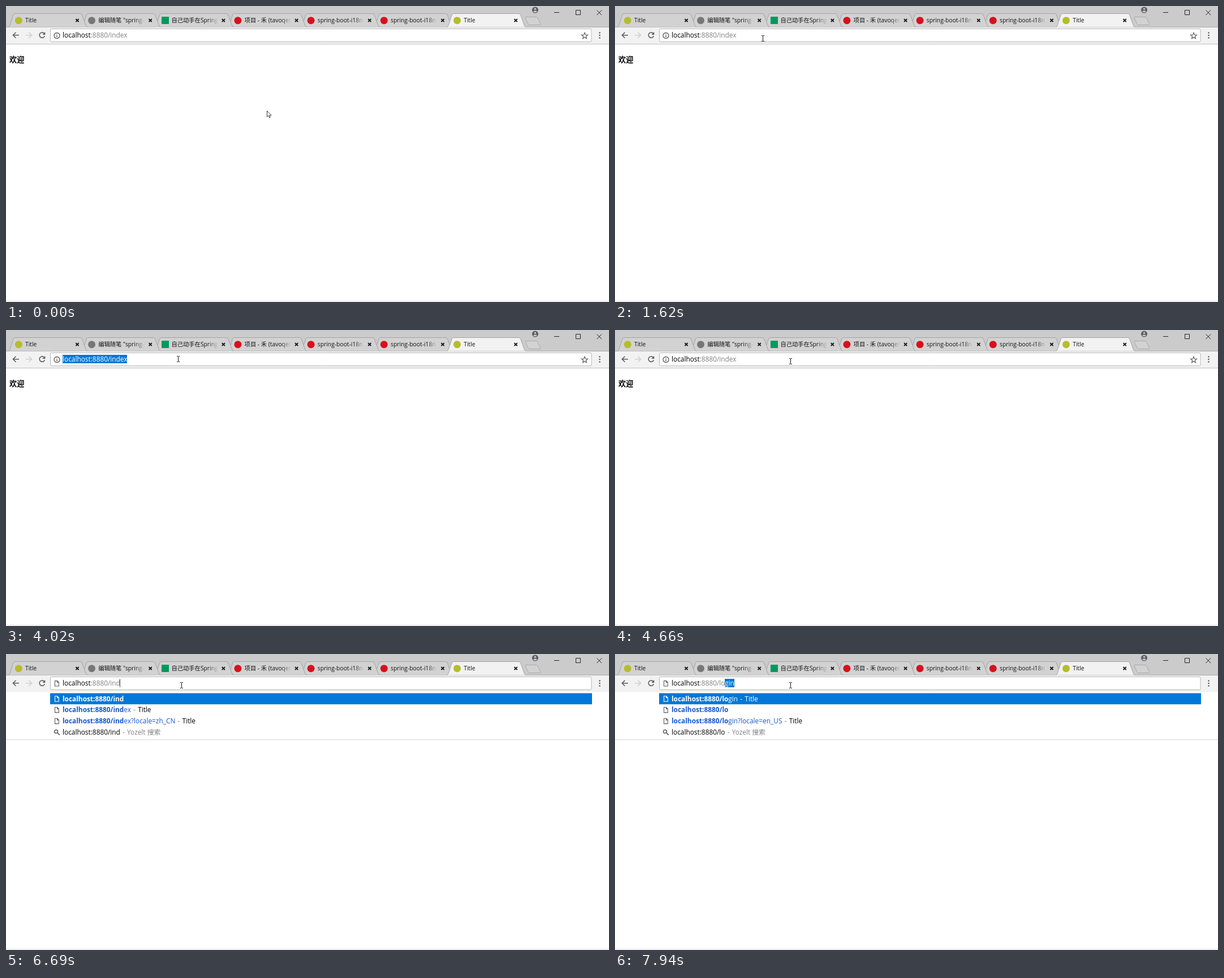
Animation, 1066 px wide and 525 px high, one loop 8 s. Source, as an HTML page with a canvas:

```html
<!DOCTYPE html>
<html lang="zh-CN">
<head>
<meta charset="utf-8">
<title>Browser address bar</title>
<style>
html, body { margin: 0; width: 100%; height: 100%; overflow: hidden; background: #fff; }
canvas { display: block; }
</style>
</head>
<body>
<canvas id="stage" width="1066" height="525"></canvas>
<script>
const ctx = document.getElementById("stage").getContext("2d");
const LOOP = 8000;
const FAMILY = '"Open Sans", "Noto Sans CJK SC", "Noto Sans CJK", sans-serif';
const BLUE = "#0078d7", LINK = "#1558cc", GREY = "#808080", ICON = "#5a5a5a";
const HOST = "localhost", BASE = "localhost:8880/";
const TEXT_X = 100, URL_SIZE = 11.86, ROW_HEIGHT = 19.7;
const TAB_PITCH = 129.2;
const TABS = [
  ["Title", "#b5bd2b"],
  ['编辑随笔 "spring-boot', "#777"],
  ["自己动手在Spring Boot", "#009a61", true],
  ["项目 - 禾 (tavoqen)", "#d8101c"],
  ["spring-boot-i18n", "#d8101c"],
  ["spring-boot-i18n", "#d8101c"],
  ["Title", "#b5bd2b"],
];

// Time, x, y of the pointer; each position holds until the next.
const POINTER = [
  [0, 461.5, 186], [70, 452, 178], [147, 415, 150], [223, 355, 108],
  [300, 305, 72], [377, 277, 50], [453, 265.5, 44.5], [530, 262.5, 50.5],
  [607, 261.5, 57.5], [2930, 264.5, 57.5], [3100, 272.5, 62.5], [3160, 291, 74],
  [3330, 299.5, 62.5], [3410, 303.5, 60.5], [3710, 303.5, 56.5], [3940, 310.5, 55.5],
  [4020, 304.5, 51.5], [4100, 296.5, 46.5], [4250, 310.5, 55.5],
];

// Time, path in the address bar, and what is shown with it.
const ADDRESS = [
  [0, "index", {}],
  [760, "index", { selectFrom: 0 }],
  [1620, "index", {}],
  [3410, "index", { caret: true }],
  [3710, "index", { selectFrom: 0 }],
  [4100, "index", { caret: true }],
  [4580, "index", {}],
  [5120, "index", { caret: true }],
  [5670, "index", {}],
  [6200, "index", { caret: true }],
  [6520, "inde", { caret: true, list: true }],
  [6690, "ind", { caret: true, list: true }],
  [6860, "in", { caret: true, list: true }],
  [7080, "i", { caret: true, list: true }],
  [7230, "", { caret: true, list: true }],
  [7630, "l", { completion: "ogin", list: true }],
  [7940, "lo", { completion: "gin", list: true }],
];

const at = (steps, time) => steps.filter(step => step[0] <= time).pop();

function rect(x, y, w, h, color) {
  ctx.fillStyle = color;
  ctx.fillRect(x, y, w, h);
}

function shape(path, { fill, stroke, width = 1, x = 0, y = 0 }) {
  const outline = new Path2D(path);
  ctx.save();
  ctx.translate(x, y);
  if (fill) { ctx.fillStyle = fill; ctx.fill(outline); }
  if (stroke) { ctx.strokeStyle = stroke; ctx.lineWidth = width; ctx.stroke(outline); }
  ctx.restore();
}

function circle(x, y, r, fill) {
  ctx.beginPath();
  ctx.arc(x, y, r, 0, Math.PI * 2);
  ctx.fillStyle = fill;
  ctx.fill();
}

// Draws text and returns the x where it ends.
function text(string, x, y, color, size = URL_SIZE, weight = 400) {
  ctx.font = `${weight} ${size}px ${FAMILY}`;
  ctx.fillStyle = color;
  ctx.fillText(string, x, y);
  return x + ctx.measureText(string).width;
}

function widthOf(string) {
  ctx.font = `400 ${URL_SIZE}px ${FAMILY}`;
  return ctx.measureText(string).width;
}

function drawTab([title, color, square], index) {
  const x = index * TAB_PITCH;
  const active = index === TABS.length - 1;
  shape("M4 37.5 Q6 37 7 34 L13 16 Q14 13.5 16 13.5 H131 Q133.5 13.5 134.5 16 L141 34 Q142 37 144 37.5",
    { x, fill: active ? "#f2f2f2" : "#d2d2d2", stroke: "#a3a3a3" });
  if (square) rect(x + 16.6, 19, 13, 13, color);
  else circle(x + 22.3, 25.7, 6.5, color);
  const fade = ctx.createLinearGradient(x + 98, 0, x + 117, 0);
  fade.addColorStop(0, "#111");
  fade.addColorStop(1, "rgba(17,17,17,0)");
  text(title, x + 34, 29.2, fade, 10.3);
  shape("M-2.6 -2.6 L2.6 2.6 M2.6 -2.6 L-2.6 2.6",
    { x: x + 126, y: 25.6, stroke: "#111", width: 1.8 });
}

function drawWindow() {
  rect(0, 0, 1066, 525, "#fff");
  rect(0, 0, 1066, 38, "#cbcbcb");
  rect(0, 37, 1066, 1, "#ababab");
  rect(0, 38, 1066, 29, "#f2f2f2");
  rect(0, 67, 1066, 1, "#c0c0c0");
  rect(0, 523, 1066, 1, "#d9d9d9");
  // Left tabs overlap right ones; the active last tab covers all.
  const last = TABS.length - 1;
  for (let i = last - 1; i >= 0; i--) drawTab(TABS[i], i);
  drawTab(TABS[last], last);

  shape("M919 19.5 H937 Q939 19.5 940 21.5 L945 32 Q945 33.5 943 33.5 H926 Q924 33.5 923 31.5 L918 21 Q918 19.5 919 19.5Z",
    { fill: "#d2d2d2", stroke: "#aaa" });
  circle(935.5, 7, 5.5, "#5c5c64");
  circle(935.5, 5.2, 1.7, "#cbcbcb");
  shape("M932 9.7 Q935.5 6.8 939 9.7 Q935.5 12.8 932 9.7Z", { fill: "#cbcbcb" });
  shape("M969 11.5 H978 M1007.5 7.5 H1015.5 V15.5 H1007.5Z M1044.5 7.5 L1053 16 M1053 7.5 L1044.5 16",
    { stroke: "#222" });

  const arrow = "M5.5 0 H-4.5 M0 -5 L-5 0 L0 5";
  shape(arrow, { x: 17.5, y: 51.7, stroke: ICON, width: 1.6 });
  ctx.save();
  ctx.translate(40.5, 51.7);
  ctx.scale(-1, 1);
  shape(arrow, { stroke: "#d0d0d0", width: 1.6 });
  ctx.restore();
  shape("M67.2 48.3 A4.7 4.7 0 1 0 68.3 53.2", { stroke: ICON, width: 1.6 });
  shape("M69.3 46 V51 H64.3Z", { fill: ICON });

  shape("M80.5 40.5 H1033 Q1035 40.5 1035 42.5 V61.5 Q1035 63.5 1033 63.5 H80.5 Q78.5 63.5 78.5 61.5 V42.5 Q78.5 40.5 80.5 40.5Z",
    { fill: "#fff", stroke: "#b5b5b5" });
  for (const y of [47.5, 52, 56.5]) circle(1049.5, y, 1.3, ICON);
}

function drawPageIcon(y, color) {
  shape("M-3.2 -4.7 H1 L3.6 -2 V4.7 H-3.2Z M0.8 -4.7 V-1.8 H3.6",
    { x: 89.7, y, stroke: color, width: 1.1 });
}

function drawInfoAndStar() {
  shape("M95 52.5 A5 5 0 1 1 85 52.5 A5 5 0 1 1 95 52.5", { stroke: ICON, width: 1.3 });
  rect(89.3, 52, 1.4, 3.3, ICON);
  rect(89.3, 49.6, 1.4, 1.4, ICON);
  let star = "";
  for (let i = 0; i < 10; i++) {
    const angle = i * Math.PI / 5, r = i % 2 ? 2.5 : 5.7;
    star += `${i ? "L" : "M"}${r * Math.sin(angle)} ${-r * Math.cos(angle)}`;
  }
  shape(star + "Z", { x: 1023, y: 53, stroke: ICON, width: 1.2 });
}

function drawAddress(path, { selectFrom, caret, completion = "" }) {
  const url = BASE + path + completion;
  const start = completion ? (BASE + path).length : selectFrom ?? url.length;
  const hostEnd = text(HOST, TEXT_X, 56.4, "#000");
  text(url.slice(HOST.length), hostEnd, 56.4, GREY);
  if (start < url.length) {
    const x = Math.round(TEXT_X + widthOf(url.slice(0, start)));
    const end = Math.round(TEXT_X + widthOf(url));
    rect(x, 44, end - x, 15, BLUE);
    text(url.slice(start), x, 56.4, "#fff");
  }
  if (caret) rect(Math.floor(TEXT_X + widthOf(url)), 44, 1, 15, "#555");
}

// Suggestions as bold part, plain part and page title.
function suggestions(path) {
  const typed = BASE + path;
  const match = (page, title = "Title") => [typed, page.slice(path.length), title];
  if (!path) return [
    ["localhost:8880", "", "Title"], match("index"), match("index?locale=zh_CN"),
    match("login?locale=en_US"), match("login"),
  ];
  if (path[0] === "i") return [[typed, ""], match("index"), match("index?locale=zh_CN")];
  return [match("login"), [typed, ""], match("login?locale=en_US")];
}

function drawTail(title, x, y, dashColor, color) {
  text("-", x + 4.2, y, dashColor);
  text(title, x + 12.2, y, color);
}

function drawList(path) {
  const rows = suggestions(path);
  const bottom = Math.floor(73 + ROW_HEIGHT * (rows.length + 1));
  rect(0, 66, 1066, bottom - 66, "#fff");
  rect(0, 66, 1066, 1, "#ededed");
  rect(0, bottom, 1066, 1, "#dedede");
  rect(0, bottom + 1, 1066, 2, "#f7f7f7");
  rect(78, 69.5, 958, ROW_HEIGHT, BLUE);

  rows.forEach(([bold, plain, title], i) => {
    const center = 79.5 + i * ROW_HEIGHT, y = center + 4.2;
    const pick = color => i === 0 ? "#fff" : color;
    drawPageIcon(center, pick(ICON));
    const boldEnd = text(bold, TEXT_X, y, pick(LINK), URL_SIZE, 700);
    const end = text(plain, boldEnd, y, pick(LINK));
    if (title) drawTail(title, end, y, pick(GREY), pick("#000"));
  });

  const center = 79.5 + rows.length * ROW_HEIGHT;
  shape("M1.8 -1.2 A3 3 0 1 1 -4.2 -1.2 A3 3 0 1 1 1.8 -1.2 M1 1 L5 5",
    { x: 89.7, y: center, stroke: ICON, width: 1.5 });
  const end = text(BASE + path, TEXT_X, center + 4.2, "#000");
  drawTail("Yozelt 搜索", end, center + 4.2, GREY, GREY);
}

function drawPointer(x, y) {
  if (y > 41 && y < 64) {
    shape("M-2.5 -5 H-0.5 M0.5 -5 H2.5 M0 -4.5 V4.5 M-2.5 5 H-0.5 M0.5 5 H2.5",
      { x, y, stroke: "#111" });
  } else {
    shape("M0 0 V10.7 L2.5 8.4 L4.1 12 L5.8 11.2 L4.3 7.8 H7.6Z",
      { x, y, fill: "#fff", stroke: "#222", width: 0.9 });
  }
}

function draw(time) {
  const [, path, view] = at(ADDRESS, time);
  const [, x, y] = at(POINTER, time);
  drawWindow();
  drawAddress(path, view);
  if (view.list) {
    drawPageIcon(52.3, ICON);
    drawList(path);
  } else {
    drawInfoAndStar();
    text("欢迎", 6, 99.5, "#000", 13.2, 700);
  }
  drawPointer(x, y);
}

const startTime = performance.now();
function frame() {
  draw((performance.now() - startTime) % LOOP);
  requestAnimationFrame(frame);
}
frame();
</script>
</body>
</html>
```
